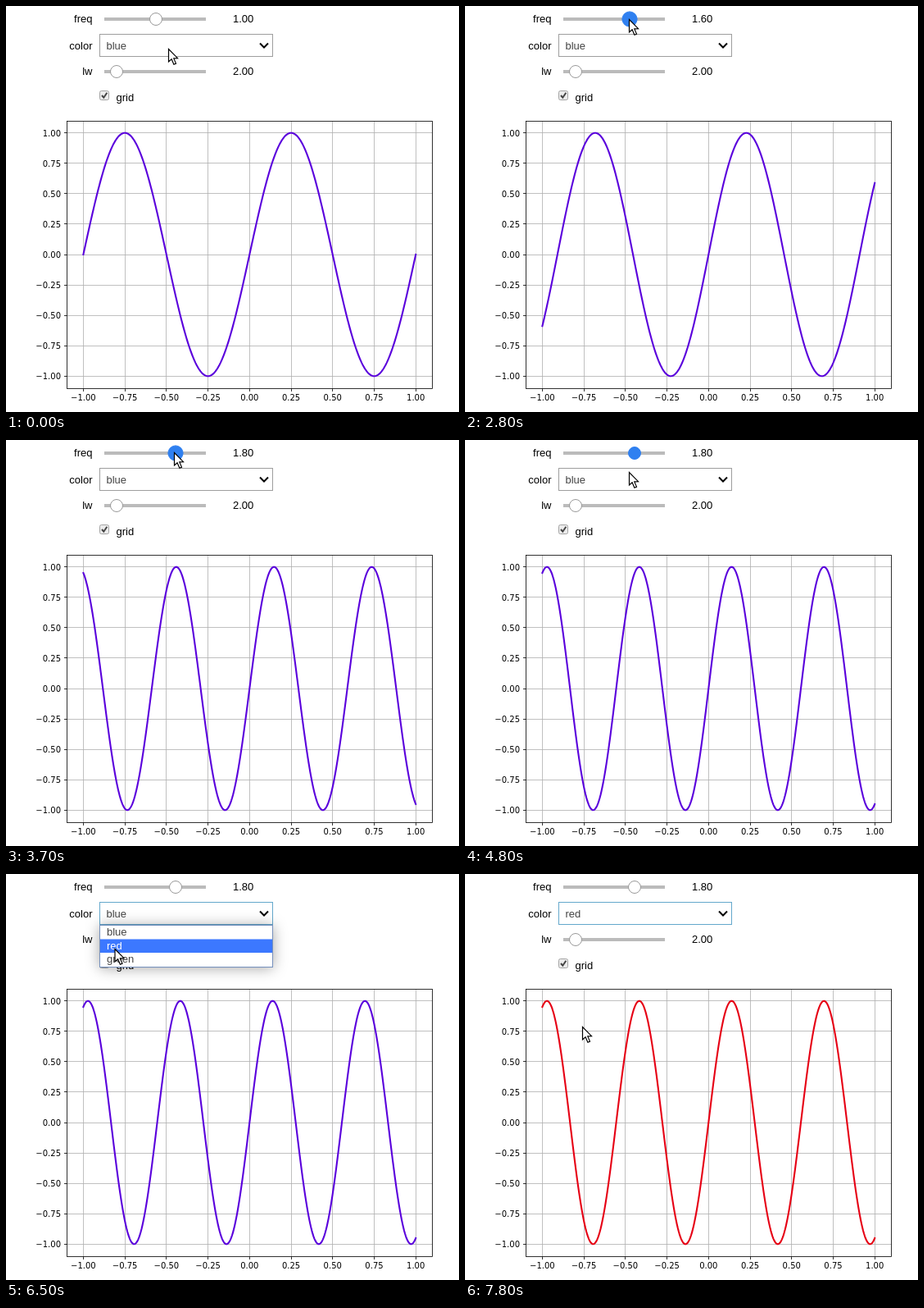
Animation of 553 by 495 pixels, one loop 8 s. Source, as an HTML page with a canvas:

```html
<!DOCTYPE html>
<html lang="en">
<head>
<meta charset="utf-8">
<title>Sine plot with controls</title>
<style>
html, body { margin: 0; width: 553px; height: 495px; overflow: hidden; background: #fff; }
canvas { display: block; }
</style>
</head>
<body>
<canvas id="stage" width="553" height="495"></canvas>
<script>
const ctx = document.getElementById('stage').getContext('2d');
const LOOP = 8000, STEP = 100;
const UI = '13px "Liberation Sans", Arial, sans-serif';
const TICK = '10px "DejaVu Sans", sans-serif';
const ACTIVE = '#2f80f0';

// Pointer path: time, x, y
const POINTER = [
  [500, 198, 52], [700, 192, 39], [900, 177, 20], [1000, 174, 17], [1100, 181, 16],
  [2200, 181, 16], [2800, 200, 16], [3000, 201, 16], [3100, 203, 16],
  [3300, 203, 16], [3400, 203, 15], [3600, 204, 15], [3700, 205, 15],
  [4600, 205, 15], [4700, 203, 27], [4800, 200, 39],
  [5300, 200, 39], [5500, 176, 53], [5600, 155, 55], [5800, 126, 48], [5900, 121, 47],
  [6300, 121, 47], [6400, 128, 72], [6500, 132.5, 91], [6700, 133, 91],
  [6800, 133, 91], [6900, 132, 89], [7500, 132, 89], [7600, 135, 112], [7800, 143, 186]
];
// Plotted frequency trails the slider
const PLOTTED = [[0, 1], [2500, 1.1], [2900, 1.4], [3300, 1.6], [3400, 1.7], [3900, 1.8]];

function along(path, t) {
  if (t <= path[0][0]) return path[0].slice(1);
  for (let i = 1; i < path.length; i++) {
    const a = path[i - 1], b = path[i];
    if (t <= b[0]) {
      const k = (t - a[0]) / (b[0] - a[0]);
      return [a[1] + (b[1] - a[1]) * k, a[2] + (b[2] - a[2]) * k];
    }
  }
  return path[path.length - 1].slice(1);
}

function held(steps, t) {
  let value = steps[0][1];
  for (const [at, v] of steps) if (t >= at) value = v;
  return value;
}

function sliderFreq(t) {
  if (t >= 3600) return 1.8;
  if (t >= 3100) return 1.7;
  return 1 + Math.min(6, Math.max(0, Math.floor((t - 2200) / 100))) / 10;
}

function text(str, x, y, color = '#000', align = 'left', font = UI) {
  ctx.font = font;
  ctx.fillStyle = color;
  ctx.textAlign = align;
  ctx.fillText(str, x, y);
}

function line(points, color, width) {
  ctx.beginPath();
  points.forEach(([x, y]) => ctx.lineTo(x, y));
  ctx.strokeStyle = color;
  ctx.lineWidth = width;
  ctx.stroke();
}

function box(x, y, w, h, fill, border) {
  ctx.fillStyle = fill;
  ctx.fillRect(x, y, w, h);
  ctx.strokeStyle = border;
  ctx.lineWidth = 1;
  ctx.strokeRect(x, y, w, h);
}

function slider(label, y, thumb, value, active, pressed) {
  text(label, 105.5, y + 4, '#000', 'right');
  ctx.fillStyle = '#bbb';
  ctx.fillRect(120, y - 2, 124, 4);
  ctx.beginPath();
  ctx.arc(thumb, y, pressed ? 9.1 : 7.5, 0, 7);
  ctx.fillStyle = active ? ACTIVE : '#fff';
  ctx.fill();
  ctx.strokeStyle = active ? ACTIVE : '#999';
  ctx.lineWidth = 1;
  ctx.stroke();
  text(value.toFixed(2), 277, y + 4);
}

function select(value, focused) {
  text('color', 105.5, 53, '#000', 'right');
  box(114.5, 34.5, 211, 27, '#fff', focused ? '#64a8cc' : '#9e9e9e');
  text(value, 122.5, 53, '#444');
  line([[310, 45.5], [315, 50.5], [320, 45.5]], '#000', 2);
}

function checkbox() {
  ctx.beginPath();
  ctx.roundRect(114.5, 103.5, 11, 11, 2);
  ctx.fillStyle = '#ececec';
  ctx.fill();
  ctx.strokeStyle = '#a3a3a3';
  ctx.lineWidth = 1;
  ctx.stroke();
  line([[117, 109], [119.3, 111.7], [123.3, 105.8]], '#444', 2);
  text('grid', 134.5, 116);
}

function menu(picked) {
  ctx.save();
  ctx.shadowColor = 'rgba(0,0,0,.35)';
  ctx.shadowBlur = 16;
  ctx.shadowOffsetY = 1;
  ctx.fillStyle = '#fff';
  ctx.fillRect(114, 62, 212, 52);
  ctx.restore();
  box(114.5, 62.5, 211, 51, '#fff', '#7590bd');
  ['blue', 'red', 'green'].forEach((name, i) => {
    const on = i === picked;
    if (on) {
      ctx.fillStyle = '#3c78ff';
      ctx.fillRect(115, 63 + i * 16.5, 210, 16.5);
    }
    text(name, 123, Math.round(75 + i * 16.5), on ? '#fff' : '#444');
  });
}

function plot(freq, color) {
  const px = v => 297.3 + v * 202.9, py = v => 303 - v * 148.25;
  const snap = v => Math.round(v - 0.5) + 0.5;
  const ticks = Array.from({ length: 9 }, (_, i) => (i - 4) / 4);
  const name = v => v.toFixed(2).replace('-', '\u2212');
  for (const v of ticks) {
    const x = snap(px(v)), y = snap(py(v));
    line([[x, 140.5], [x, 466.5]], '#b0b0b0', 0.8);
    line([[74.5, y], [520.5, y]], '#b0b0b0', 0.8);
    line([[x, 466.5], [x, 470]], '#000', 0.8);
    line([[71, y], [74.5, y]], '#000', 0.8);
    text(name(v), px(v), 481, '#000', 'center', TICK);
    text(name(v), 67, Math.round(py(v)) + 4, '#000', 'right', TICK);
  }
  const curve = [];
  for (let i = 0; i <= 400; i++) {
    const x = i / 200 - 1;
    curve.push([px(x), py(Math.sin(2 * Math.PI * freq * x))]);
  }
  ctx.lineCap = 'square';
  ctx.lineJoin = 'round';
  line(curve, color, 2.1);
  ctx.lineCap = 'butt';
  ctx.lineJoin = 'miter';
  ctx.strokeStyle = '#000';
  ctx.lineWidth = 0.8;
  ctx.strokeRect(74.5, 140.5, 446, 326);
}

function pointer(x, y) {
  ctx.save();
  ctx.translate(x + 0.5, y + 0.5);
  ctx.beginPath();
  [[0, 0], [0, 15.5], [3.6, 12.3], [6.4, 18.8], [9, 17.6], [6.3, 11.4], [11, 11.2]]
    .forEach(p => ctx.lineTo(...p));
  ctx.closePath();
  ctx.fillStyle = '#fff';
  ctx.fill();
  ctx.strokeStyle = '#000';
  ctx.lineWidth = 1.2;
  ctx.stroke();
  ctx.restore();
}

function draw(t) {
  ctx.fillStyle = '#fff';
  ctx.fillRect(0, 0, 553, 495);
  const freq = sliderFreq(t);
  slider('freq', 16, 183 + (freq - 1) * 30, freq, t >= 900 && t < 6100, t >= 1700 && t < 4500);
  select(t < 7300 ? 'blue' : 'red', t >= 6100);
  slider('lw', 80, 135, 2, false, false);
  checkbox();
  plot(held(PLOTTED, t), t < 7700 ? '#5a00dc' : '#e60014');
  if (t >= 6100 && t < 7300) menu(t < 6500 ? 0 : 1);
  pointer(...along(POINTER, t));
}

function frame(now) {
  draw(Math.floor((now % LOOP) / STEP) * STEP);
  requestAnimationFrame(frame);
}
draw(0);
requestAnimationFrame(frame);
</script>
</body>
</html>
```
